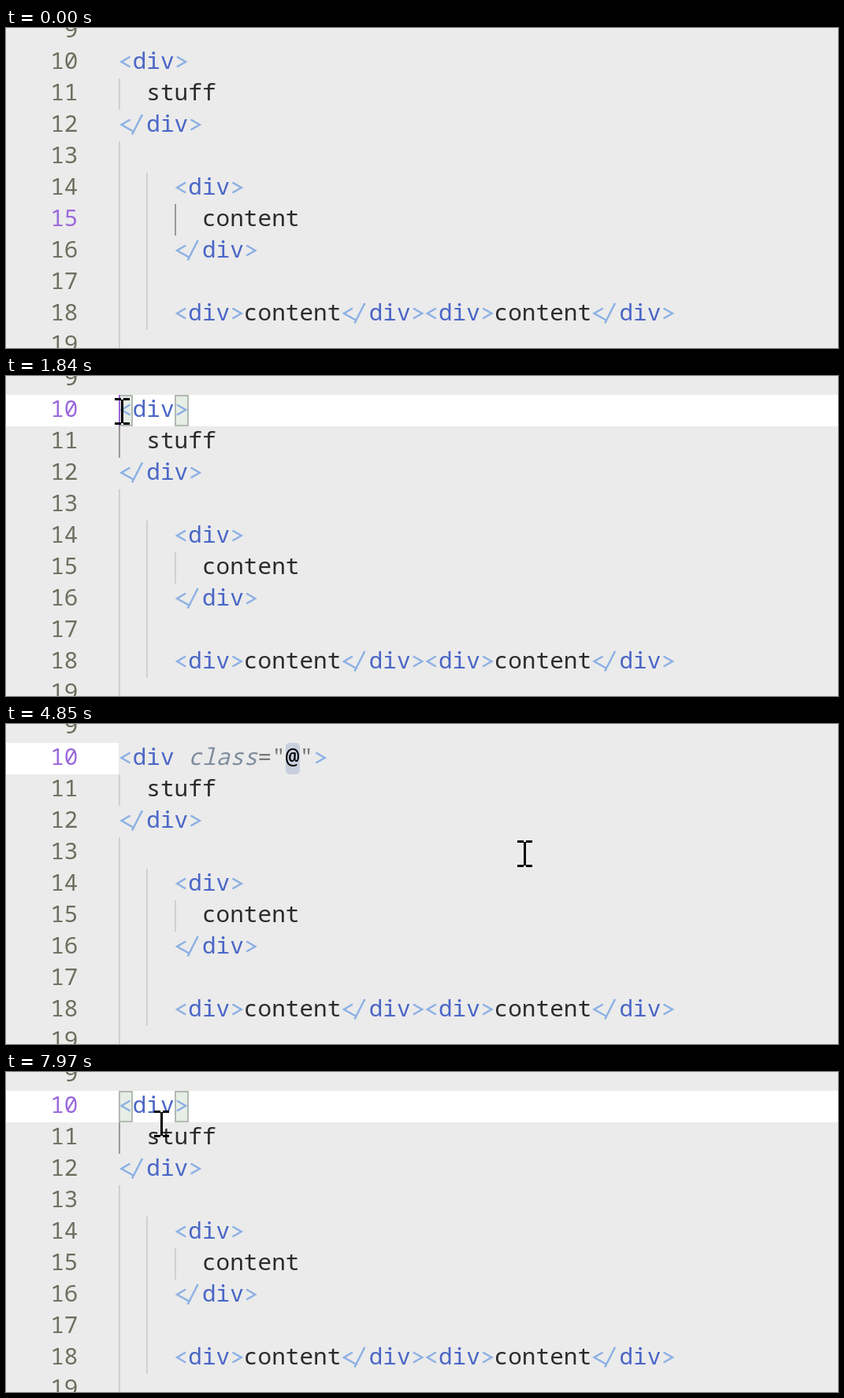
Animation, 1056 px wide and 407 px high, one loop 8 s. Source, as an HTML page with a canvas:

```html
<!DOCTYPE html>
<html lang="en">
<head>
<meta charset="utf-8">
<title>Editor</title>
<style>
  html, body { margin: 0; width: 100%; height: 100%; overflow: hidden; background: #ebebeb; }
  canvas { display: block; }
</style>
</head>
<body>
<canvas id="stage" width="1056" height="407"></canvas>
<script>
const ctx = document.getElementById('stage').getContext('2d');
const LOOP = 8000, CELL = 17.65, LEFT = 143, ROW = 40;
const FONT = '500 29.4px "Noto Sans Mono", monospace';
const COLORS = { div: '#4a66c6', class: '#7f8d9c', '=': '#777', '"': '#777', '@': '#000' };
const PUNCT = '#8cb0e4';

const lines = [
  [11, 2, 'stuff'],
  [12, 0, '</div>'],
  [14, 4, '<div>'],
  [15, 6, 'content'],
  [16, 4, '</div>'],
  [18, 4, '<div>content</div><div>content</div>']
];

// Pointer strokes: start, end, from x, y, to x, y
const moves = [
  [380, 1140, 579, 400, 169, 44],
  [1220, 1300, 151, 45, 147, 45],
  [3240, 4020, 147, 45, 655, 153],
  [4620, 4850, 655, 153, 658, 165],
  [7400, 7670, 658, 165, 285, 77],
  [7890, 7970, 204, 66, 197, 66]
];

// Spans in which the text caret is lit
const caretSpans = [[1700, 2200], [2700, 3240], [3740, 4140], [4370, 4850],
  [5330, 5860], [6320, 6800], [7330, 7930]];

const rowTop = row => 24 + (row - 10) * ROW;
const colX = col => LEFT + col * CELL;
const within = (t, a, b) => t >= a && t < b;

function rect(color, x, y, w, h) {
  ctx.fillStyle = color;
  ctx.fillRect(x, y, w, h);
}

function stroke(x, y, ...points) {
  ctx.beginPath();
  points.forEach(([px, py]) => ctx.lineTo(x + px, y + py));
  ctx.stroke();
}

function drawPunct(token, x, y) {
  ctx.strokeStyle = PUNCT;
  ctx.lineWidth = 2.5;
  if (token === '>') stroke(x, y, [3.3, -6.5], [14.5, 0], [3.3, 6.5]);
  else if (token === '<') stroke(x, y, [14.5, -6.5], [3.5, 0], [14.5, 6.5]);
  else {
    stroke(x, y, [14.5, -6.5], [3.5, 0], [18.5, 8.5]);
    stroke(x, y, [17, 12.5], [30, -13]);
  }
}

function drawText(text, x, baseline) {
  [...text].forEach((ch, i) => ctx.fillText(ch, x + i * CELL, baseline));
}

function drawCode(row, col, text) {
  const top = rowTop(row);
  for (const match of text.matchAll(/<\/|[<>="@]|\w+?(?=\W|$)/g)) {
    const token = match[0], x = colX(col + match.index);
    if (/[<>]/.test(token)) {
      drawPunct(token, x, top + 19);
      continue;
    }
    ctx.font = token === 'class' ? 'italic ' + FONT : FONT;
    ctx.fillStyle = COLORS[token] || '#2b2b2b';
    drawText(token, x, top + 28);
  }
}

function drawGuides(activeRow) {
  const shade = row => row === activeRow ? '#999' : '#d0d0d0';
  rect(shade(11), 143, 64, 2, 40);
  rect(shade(13), 143, 144, 2, 263);
  rect(shade(14), 178, 184, 2, 200);
  rect(shade(15), 214, 224, 2, 40);
}

function drawNumbers(activeRow) {
  ctx.font = FONT;
  for (let n = 9; n <= 19; n++) {
    ctx.fillStyle = n === activeRow ? '#9a68da' : '#6e6e5f';
    const label = String(n);
    drawText(label, 91.5 - label.length * CELL, rowTop(n) + 28);
  }
}

function drawBracketBox(col) {
  const x = Math.round(colX(col));
  rect('#b2bab2', x, 24, 18, 40);
  rect('#e6eee6', x + 2, 26, 14, 36);
}

function drawSelection() {
  ctx.fillStyle = '#c8cfdd';
  ctx.beginPath();
  ctx.roundRect(355, 24, 18, 40, 5);
  ctx.fill();
}

function pointerAt(t) {
  const index = moves.findLastIndex(m => t >= m[0]);
  if (index < 0) return null;
  const [start, end, x0, y0, x1, y1] = moves[index];
  const p = Math.min(1, Math.floor((t - start) / 76) * 76 / (end - start));
  const e = index ? p * p * (3 - 2 * p) : 1 - (1 - p) ** 2;
  return [x0 + (x1 - x0) * e, y0 + (y1 - y0) * e].map(Math.round);
}

function drawPointer([x, y]) {
  rect('#000', x - 1, y - 15, 3, 30);
  for (const edge of [y - 17, y + 14]) {
    rect('#000', x - 9, edge, 8, 3);
    rect('#000', x + 2, edge, 8, 3);
  }
}

function draw(t) {
  const focused = t >= 1700;
  const edited = within(t, 4370, 7450);
  const activeRow = focused ? 10 : 15;

  rect('#ebebeb', 0, 0, 1056, 407);
  if (focused) rect('#fff', 0, 24, edited ? LEFT : 1056, ROW);
  drawGuides(edited ? 0 : focused ? 11 : 15);
  if (edited) drawSelection();
  else if (t >= 1770) [0, 4].forEach(drawBracketBox);

  drawNumbers(activeRow);
  drawCode(10, 0, edited ? '<div class="@">' : '<div>');
  lines.forEach(line => drawCode(...line));

  if (caretSpans.some(([a, b]) => within(t, a, b))) {
    rect('#9a68da', edited ? 373 : 143, 24, 2, ROW);
  }
  const pointer = pointerAt(t);
  if (pointer) drawPointer(pointer);
}

function tick() {
  draw(performance.now() % LOOP);
  requestAnimationFrame(tick);
}
tick();
</script>
</body>
</html>
```
